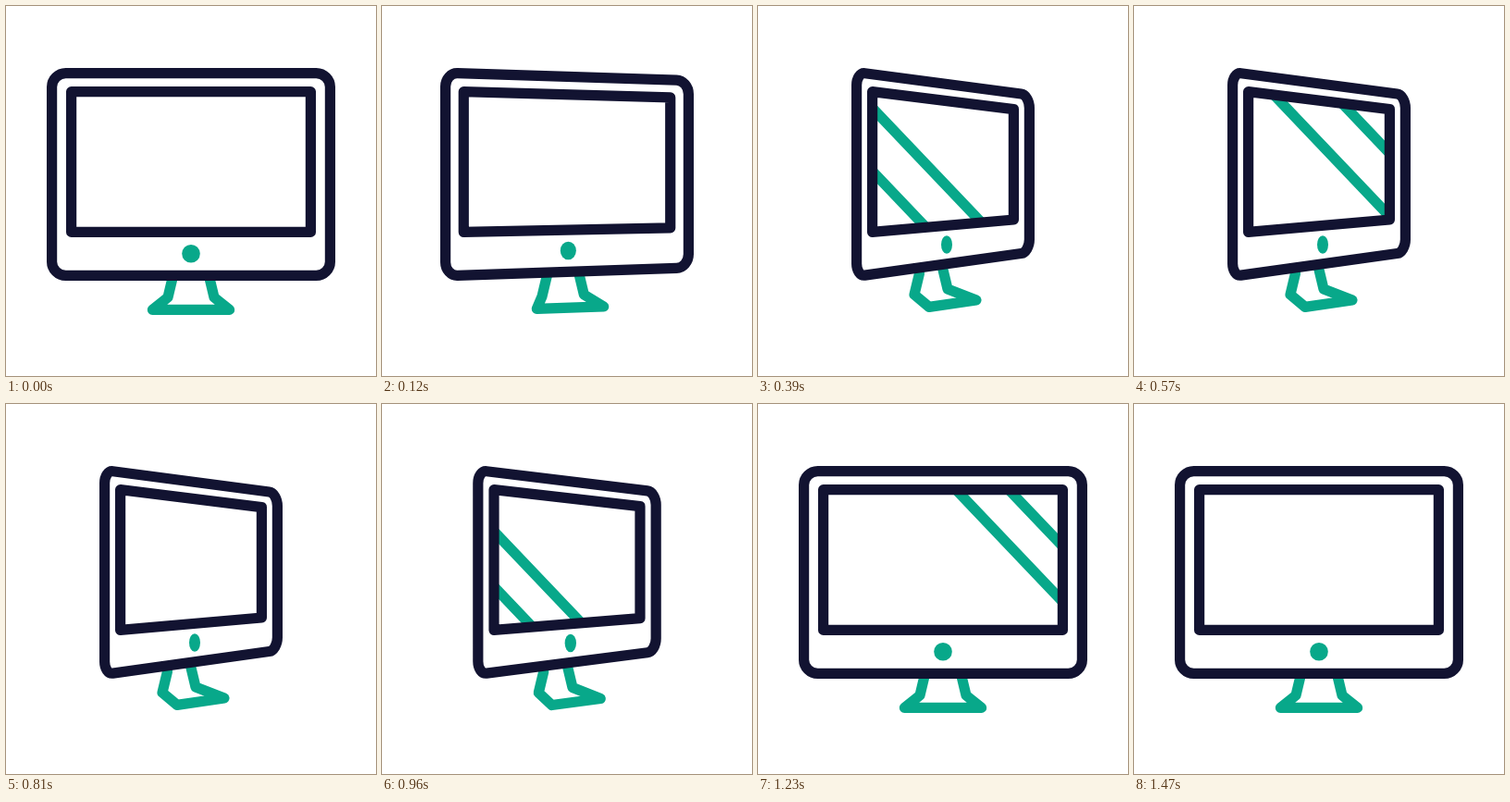
An HTML page with a canvas for the animation above (1620 ms loop, 400 by 400 pixels).

```html
<!DOCTYPE html>
<html lang="en">
<head>
<meta charset="utf-8">
<title>Turning monitor</title>
<style>
  html, body { margin: 0; width: 100%; height: 100%; overflow: hidden; background: #fff; }
  canvas { display: block; width: 400px; height: 400px; }
</style>
</head>
<body>
<canvas id="stage" width="400" height="400"></canvas>
<script>
const ctx = document.getElementById('stage').getContext('2d');
const NAVY = '#121331', TEAL = '#08a88a';
const LOOP = 1620, STEP = 30, LAST = 1470;
const TURN = 290, BACK = 909, SLOPE = 1.05;

// Turning insets both sides, tilts the right corners inward and flares the left ones.
const body = { left: 49.6, top: 72.6, bottom: 291.4, inset: 57, drop: 23.6, lift: 25.1, flare: 1 };
const glass = { left: 70.6, top: 92.6, bottom: 244.4, inset: 53, drop: 19, lift: 13.4, flare: 0 };

// Each glare decelerates away from its midpoint in time and place.
const glares = [
  { time: 180, mid: -116, reach: 455, rate: 0.00143, gap: 65 },
  { time: 1035, mid: 45, reach: 284, rate: 0.0026, gap: 57 }
];

const mix = (a, b, k) => a + (b - a) * k;
const mixPoint = (a, b, k) => [mix(a[0], b[0], k), mix(a[1], b[1], k)];
const clamp = (x, lo, hi) => Math.min(hi, Math.max(lo, x));

// cubic-bezier(.5, 0, .5, 1)
function ease(x) {
  if (x <= 0) return 0;
  if (x >= 1) return 1;
  let lo = 0, hi = 1;
  for (let i = 0; i < 24; i++) {
    const s = (lo + hi) / 2;
    if (1.5 * s * (1 - s) + s ** 3 < x) lo = s; else hi = s;
  }
  return lo * lo * (3 - 2 * lo);
}

function panel({ left, top, bottom, inset, drop, lift, flare }, k) {
  const l = left + inset * k, r = 400 - l;
  return [
    [l, top - flare * k], [r, top + drop * k],
    [r, bottom - lift * k], [l, bottom + flare * k]
  ];
}

// One leg from neck to foot; the other is its mirror image.
function stand(k) {
  const leg = [[180.5, 292], [175, 315], [158.4, 328.4]];
  const mirror = leg.map(([x, y]) => [400 - x, y]);
  const swing = (points, neck, foot) => points.map(([x, y], i) => {
    const [dx, dy] = i < 2 ? neck : foot;
    return [x + dx * k, y + dy * k];
  });
  return [
    ...swing(leg, [-6, -3], [26.6, -3]),
    ...swing(mirror, [-20, -9], [-5.6, -10.4]).reverse()
  ];
}

function polygon(points, closed) {
  const path = new Path2D();
  points.forEach(p => path.lineTo(...p));
  if (closed) path.closePath();
  return path;
}

function rounded(quad, rx, ry) {
  const path = new Path2D();
  const toward = (a, b, r) => mixPoint(a, b, r / Math.hypot(b[0] - a[0], b[1] - a[1]));
  quad.forEach((c, i) => {
    const [rIn, rOut] = i % 2 ? [rx, ry] : [ry, rx];
    const a = toward(c, quad[(i + 3) % 4], rIn);
    const b = toward(c, quad[(i + 1) % 4], rOut);
    path.lineTo(...a);
    path.bezierCurveTo(...mixPoint(a, c, 0.55), ...mixPoint(b, c, 0.55), ...b);
  });
  path.closePath();
  return path;
}

function stroke(path, color) {
  ctx.strokeStyle = color;
  ctx.stroke(path);
}

function drawGlares(t, clip) {
  ctx.save();
  ctx.clip(clip);
  for (const { time, mid, reach, rate, gap } of glares) {
    const phase = clamp(rate * (t - time), -Math.PI / 2, Math.PI / 2);
    const lead = mid + reach * Math.sin(phase);
    for (const x of [lead, lead - gap]) {
      stroke(polygon([[x, 0], [x + 400 / SLOPE, 400]]), TEAL);
    }
  }
  ctx.restore();
}

function draw(t) {
  const k = ease(t / TURN) - ease((t - BACK) / TURN);
  const screen = polygon(panel(glass, k), true);

  ctx.fillStyle = '#fff';
  ctx.fillRect(0, 0, 400, 400);
  ctx.lineCap = ctx.lineJoin = 'round';
  ctx.lineWidth = 11.2;

  stroke(polygon(stand(k)), TEAL);
  drawGlares(t, screen);
  stroke(screen, NAVY);
  stroke(rounded(panel(body, k), mix(15, 9, k), mix(15, 14, k)), NAVY);

  ctx.fillStyle = TEAL;
  ctx.beginPath();
  ctx.ellipse(mix(200, 204, k), mix(267.8, 258, k), mix(9.8, 6, k), 9.8, 0, 0, Math.PI * 2);
  ctx.fill();
}

const start = performance.now();
function tick() {
  const t = (performance.now() - start) % LOOP;
  draw(Math.min(LAST, Math.floor(t / STEP) * STEP));
  requestAnimationFrame(tick);
}
tick();
</script>
</body>
</html>
```
